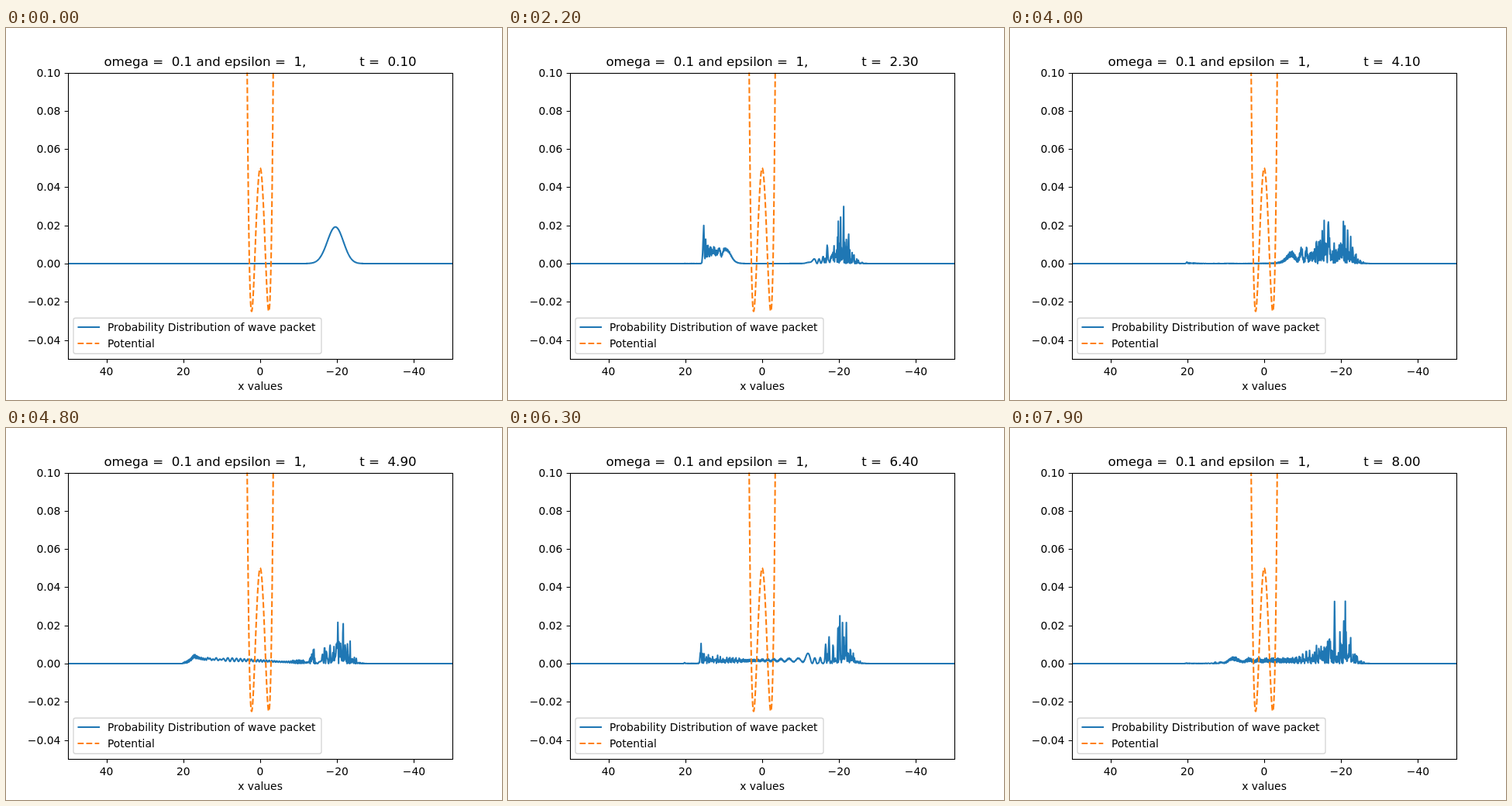
Animation, 640 px wide and 480 px high, one loop 8000 ms. Source, as an HTML page:

```html
<!DOCTYPE html>
<html lang="en">
<head>
<meta charset="utf-8">
<title>Wave packet in a double well</title>
<style>
  html, body { margin: 0; width: 100%; height: 100%; overflow: hidden; background: #fff; }
  svg { display: block; width: 640px; height: 480px; }
  text { font: 13.89px "DejaVu Sans", sans-serif; white-space: pre; }
  #title { font-size: 16.67px; }
  .curve { fill: none; stroke-width: 2.08; stroke-linejoin: round; }
  .wave { stroke: #1f77b4; stroke-linecap: square; }
  .well { stroke: #ff7f0e; stroke-dasharray: 7.71 3.33; }
  .axis { fill: none; stroke: #000; stroke-width: 1.11; }
</style>
</head>
<body>
<svg viewBox="0 0 640 480">
  <clipPath id="area"><rect x="80" y="57.6" width="496" height="369.6"/></clipPath>
  <g clip-path="url(#area)">
    <path id="wave" class="curve wave"/>
    <path id="well" class="curve well"/>
  </g>
  <path id="ticks" class="axis"/>
  <rect class="axis" x="80.5" y="58.5" width="496" height="369"/>
  <g id="labels"></g>
  <text x="328" y="467" text-anchor="middle">x values</text>
  <rect x="87" y="374.3" width="320" height="46" rx="2.8" fill="#fff" fill-opacity=".8" stroke="#ccc" stroke-opacity=".8" stroke-width="1.39"/>
  <path class="curve wave" d="M93.5 386H120"/>
  <path class="curve well" d="M92.5 407H120.3"/>
  <text x="131" y="391">Probability Distribution of wave packet</text>
  <text x="131" y="412">Potential</text>
  <text id="title" x="328" y="49" text-anchor="middle"></text>
</svg>
<script>
const byId = id => document.getElementById(id);
const px = x => 328 - 4.96 * x;
const py = v => 304 - 2464 * v;
const point = (x, v) => px(x).toFixed(2) + ' ' + py(v).toFixed(2);

const omega = 0.1;
const potential = x => {
  const s = omega * x * x;
  return omega / 2 * (1 - 6 * s + 6 * s * s);
};

const FRAMES = 80, FRAME_MS = 100;
const N = 1024, dx = 0.1, steps = 50, dt = 0.1 / steps;
const startX = -20;
const gridX = i => (i - N / 2) * dx;

// Unit complex numbers exp(-i * angle(j)), times a scale
function phases(count, angle, scale = 1) {
  const re = new Float64Array(count), im = new Float64Array(count);
  for (let j = 0; j < count; j++) {
    re[j] = scale * Math.cos(angle(j));
    im[j] = -scale * Math.sin(angle(j));
  }
  return { re, im };
}

const twiddle = phases(N / 2, j => 2 * Math.PI * j / N);

// In-place radix-2 transform; swapping the arguments gives the inverse
function fft(re, im) {
  for (let i = 1, j = 0; i < N; i++) {
    let bit = N >> 1;
    for (; j & bit; bit >>= 1) j ^= bit;
    j ^= bit;
    if (i < j) {
      let t = re[i]; re[i] = re[j]; re[j] = t;
      t = im[i]; im[i] = im[j]; im[j] = t;
    }
  }
  for (let half = 1; half < N; half *= 2) {
    const stride = N / (2 * half);
    for (let base = 0; base < N; base += 2 * half) {
      for (let k = 0; k < half; k++) {
        const wr = twiddle.re[k * stride], wi = twiddle.im[k * stride];
        const a = base + k, b = a + half;
        const tr = re[b] * wr - im[b] * wi, ti = re[b] * wi + im[b] * wr;
        re[b] = re[a] - tr; im[b] = im[a] - ti;
        re[a] += tr; im[a] += ti;
      }
    }
  }
}

// Split-operator solution of i psi' = -psi''/2 + V psi, starting from a displaced ground state
function simulate() {
  const re = new Float64Array(N), im = new Float64Array(N);
  const norm = Math.sqrt(dx * Math.sqrt(omega / Math.PI));
  for (let i = 0; i < N; i++) {
    re[i] = norm * Math.exp(-omega * (gridX(i) - startX) ** 2 / 2);
  }
  const halfKick = phases(N, i => potential(gridX(i)) * dt / 2);
  const drift = phases(N, i => {
    const k = 2 * Math.PI * (i < N / 2 ? i : i - N) / (N * dx);
    return k * k * dt / 2;
  }, 1 / N);
  const rotate = p => {
    for (let i = 0; i < N; i++) {
      const r = re[i];
      re[i] = r * p.re[i] - im[i] * p.im[i];
      im[i] = r * p.im[i] + im[i] * p.re[i];
    }
  };
  const paths = [];
  for (let n = 0; n < FRAMES; n++) {
    for (let s = 0; s < steps; s++) {
      rotate(halfKick);
      fft(re, im);
      rotate(drift);
      fft(im, re);
      rotate(halfKick);
    }
    const points = [];
    for (let i = N - 1; i >= 0; i--) {
      points.push(point(gridX(i), re[i] * re[i] + im[i] * im[i]));
    }
    paths.push('M' + points.join('L'));
  }
  return paths;
}

function drawAxes() {
  let ticks = '', labels = '';
  const name = (v, digits) => v.toFixed(digits).replace('-', '\u2212');
  for (let x = 40; x >= -40; x -= 20) {
    ticks += `M${Math.round(px(x)) + 0.5} 427.5v4.86`;
    labels += `<text x="${px(x)}" y="448" text-anchor="middle">${name(x, 0)}</text>`;
  }
  for (let i = -2; i <= 5; i++) {
    const y = py(i * 0.02);
    ticks += `M80.5 ${Math.round(y) + 0.5}h-4.86`;
    labels += `<text x="70.3" y="${Math.round(y + 5)}" text-anchor="end">${name(i * 0.02, 2)}</text>`;
  }
  byId('ticks').setAttribute('d', ticks);
  byId('labels').innerHTML = labels;

  const well = [];
  for (let x = 3.47; x > -3.6; x -= 0.05) well.push(point(x, potential(x)));
  byId('well').setAttribute('d', 'M' + well.join('L'));
}

drawAxes();
const waves = simulate();
let shown = -1, origin = null;

function render(ms) {
  const n = Math.floor(ms / FRAME_MS) % FRAMES;
  if (n === shown) return;
  shown = n;
  byId('wave').setAttribute('d', waves[n]);
  byId('title').textContent =
    'omega =  0.1 and epsilon =  1,' + ' '.repeat(13) + 't =  ' + ((n + 1) / 10).toFixed(2);
}

function tick(now) {
  if (origin === null) origin = now;
  render(Math.max(0, now - origin));
  requestAnimationFrame(tick);
}
render(0);
requestAnimationFrame(tick);
</script>
</body>
</html>
```
